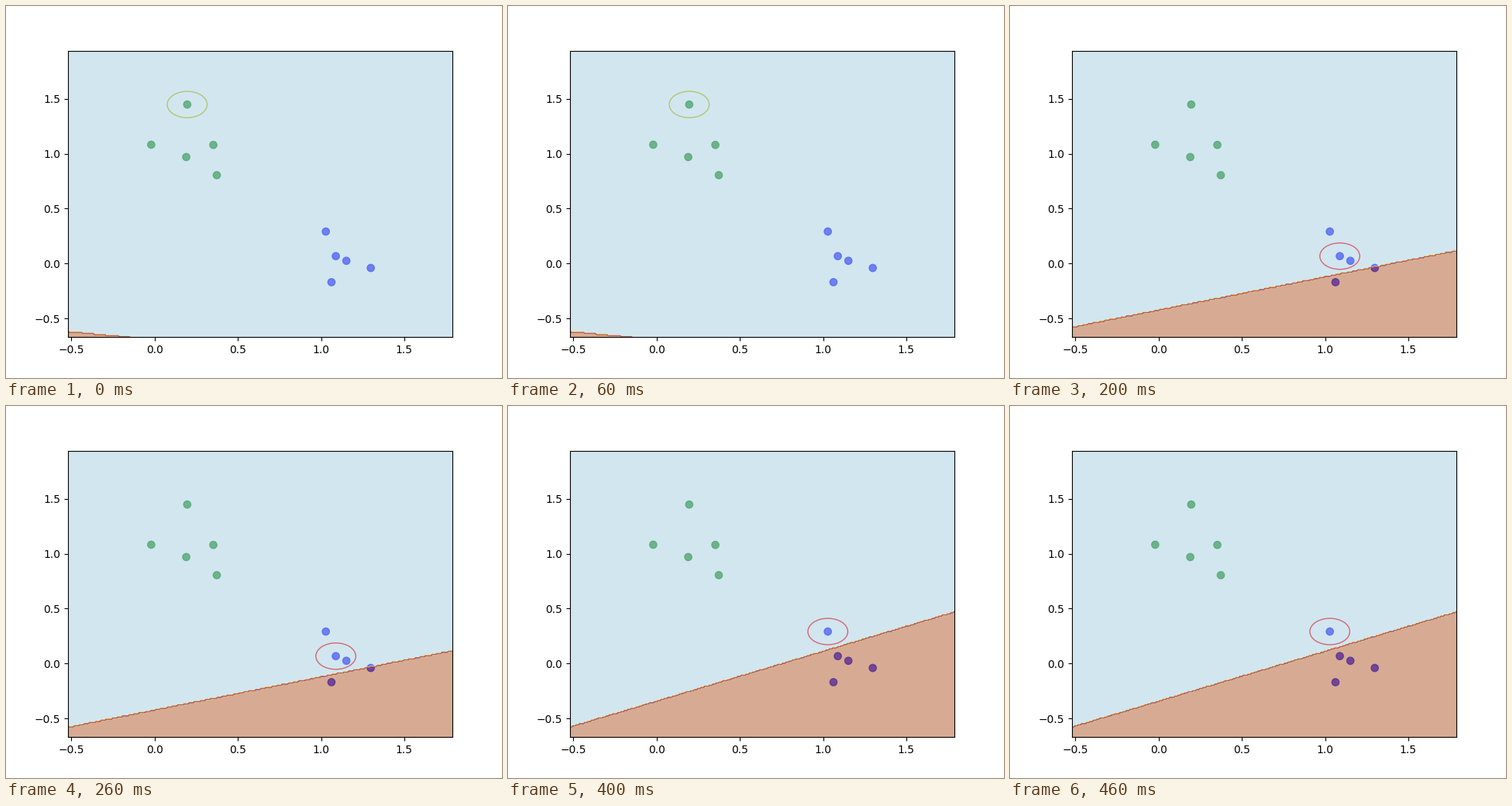
Animation, 640 px wide and 480 px high, one loop 0.5 s. Source, as a matplotlib script:

```python
import matplotlib.pyplot as plt
import numpy as np
from matplotlib.animation import FuncAnimation

PER_CLASS = 5
CELL = 0.01
MARGIN = 0.5

# Two Gaussian clusters, around (0, 1) and (1, 0)
np.random.seed(0)
centers = np.repeat([(0, 1), (1, 0)], PER_CLASS, axis=0)
points = centers + np.random.normal(scale=0.2, size=centers.shape)
point_colors = ["green"] * PER_CLASS + ["blue"] * PER_CLASS

# Visited point, and the boundary's height at the left and right edge
STEPS = [
    (1, (-0.620, -0.932)),
    (4, (-0.75, -0.91)),
    (7, (-0.580, 0.118)),
    (3, (-0.640, -0.235)),
    (5, (-0.578, 0.471)),
]

xs, ys = (np.arange(v.min() - MARGIN, v.max() + MARGIN, CELL)
          for v in points.T)
grid_x, grid_y = np.meshgrid(xs, ys)

fig, ax = plt.subplots(figsize=(6.4, 4.8), dpi=100)


def draw_regions(edges):
    boundary = np.interp(grid_x, xs[[0, -1]], edges)
    below = (grid_y < boundary).astype(float)
    if below.any():
        ax.contourf(grid_x, grid_y, below, cmap="Paired", alpha=0.5)
    else:
        ax.contourf(grid_x, grid_y, below, levels=[-1, 1],
                    colors=[plt.cm.Paired(3)], alpha=0.5)


def update(frame):
    index, edges = STEPS[frame]
    ring_color = "y" if index < PER_CLASS else "r"
    ax.clear()
    ax.scatter(*points.T, s=45, c=point_colors, alpha=0.8)
    ax.add_patch(plt.Circle(points[index], 0.12, color=ring_color, fill=False))
    # The translucent regions tint the points and the ring
    draw_regions(edges)
    ax.set_xlim(xs[0], xs[-1])
    ax.set_ylim(ys[0], ys[-1])


anim = FuncAnimation(fig, update, frames=len(STEPS), interval=100,
                     repeat=True, repeat_delay=0)
plt.show()
```
